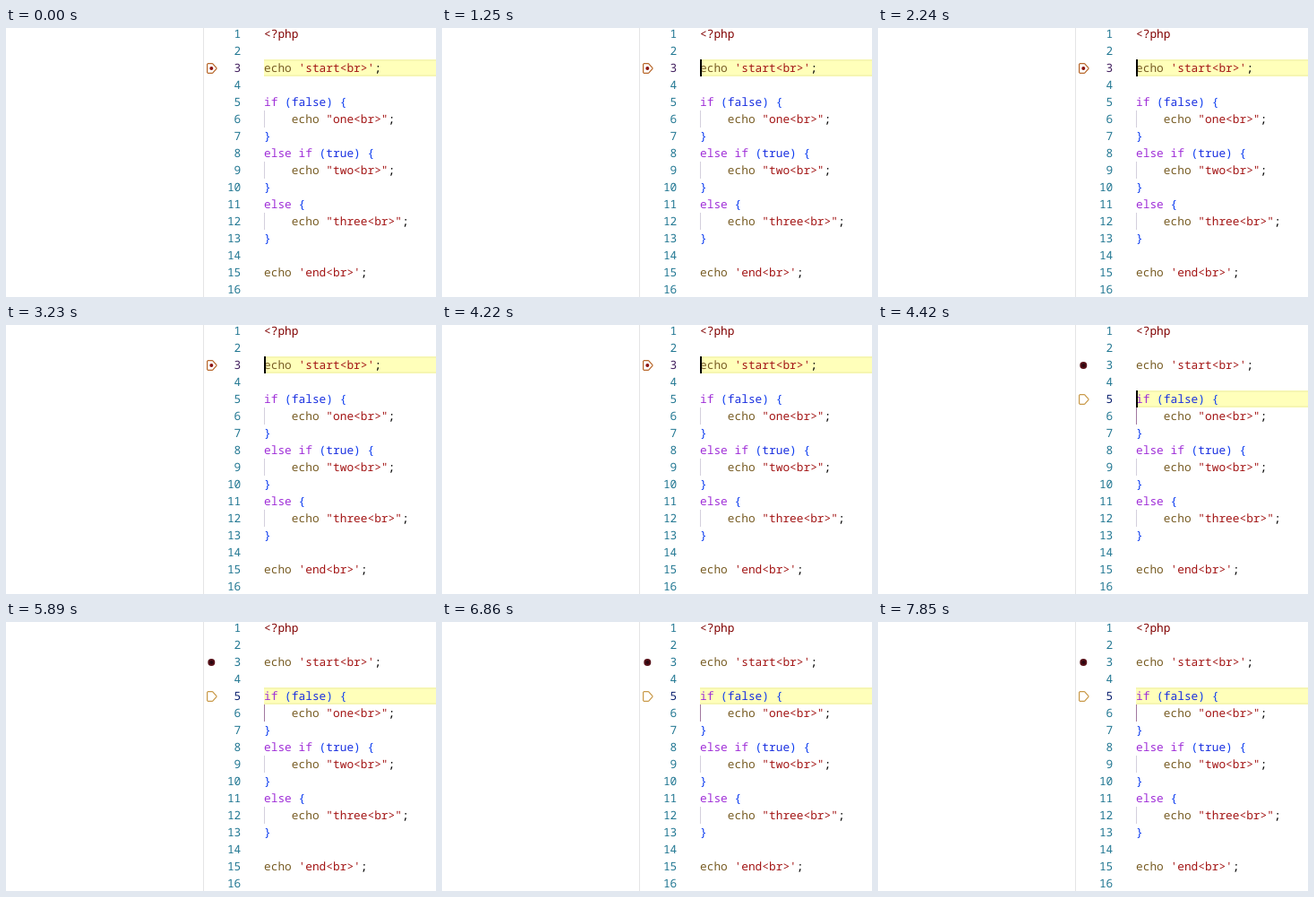
An HTML page that plays this animation: 480x300 px, repeating every 8 s.

```html
<!DOCTYPE html>
<html lang="en">
<head>
<meta charset="utf-8">
<title>Stepping through PHP code</title>
<style>
  html, body { margin: 0; width: 100%; height: 100%; overflow: hidden; background: #fff; }
  svg { display: block; width: 480px; height: 300px; }
  text {
    font: 12.83px "Noto Sans Mono", "DejaVu Sans Mono", monospace;
    white-space: pre;
    text-rendering: geometricPrecision;
  }
  .num { text-anchor: end; fill: #237893; }
  .tag { fill: #800000; }
  .fn { fill: #795e26; }
  .str { fill: #a31515; }
  .key { fill: #a030d8; }
  .const { fill: #1a30e0; }
  .brace { fill: #0c3cf0; }
  .plain { fill: #000; }
</style>
</head>
<body>
<svg id="stage" viewBox="0 0 480 300"></svg>
<script>
(() => {
  const LOOP = 8000, LINE = 19, LEFT = 288;
  const PAUSE_END = 4350, NEXT_STOP = 4420;
  const BLINKS = [260, 790, 1250, 1780, 2240, 2770, 3230, 3760, 4220,
    4830, 5360, 5890, 6350, 6860, 7320, 7850];
  const CODE = [
    "<?php", "", "echo 'start<br>';", "",
    "if (false) {", "    echo \"one<br>\";", "}",
    "else if (true) {", "    echo \"two<br>\";", "}",
    "else {", "    echo \"three<br>\";", "}",
    "", "echo 'end<br>';", ""
  ];
  const ARROW = "M14.5 7.15 10.24 2.41 9.31 2H4.25L3 3.25v9.48l1.25 1.25h5.06l.93-.42 4.26-4.74z" +
    "M9.31 12.73H4.25V3.25h5.06l4.26 4.74z";

  const stage = document.getElementById("stage");
  const rowTop = n => 35 + LINE * (n - 3);

  function add(name, attrs, parent = stage) {
    const node = document.createElementNS("http://www.w3.org/2000/svg", name);
    for (const key in attrs) node.setAttribute(key, attrs[key]);
    return parent.appendChild(node);
  }

  const rect = (x, y, width, height, fill, parent) =>
    add("rect", { x, y, width, height, fill }, parent);

  const show = (node, on) => node.setAttribute("visibility", on ? "visible" : "hidden");

  function kind(token) {
    if (token === "<?php") return "tag";
    if (token === "echo") return "fn";
    if (/^['"]/.test(token)) return "str";
    if (/^(if|else)$/.test(token)) return "key";
    if (/^(true|false)$/.test(token)) return "const";
    return /[(){}]/.test(token) ? "brace" : "plain";
  }

  function drawLine(source, n) {
    const y = rowTop(n) + 14;
    const num = add("text", { x: 262.3, y, class: "num" });
    num.textContent = n;
    const line = add("text", { x: LEFT, y });
    for (const token of source.match(/<\?php|'[^']*'|"[^"]*"|\w+|\s+|./g) || []) {
      add("tspan", { class: kind(token) }, line).textContent = token;
    }
    return num;
  }

  rect(220, 0, 1, 300, "#e4e4e6");

  const current = add("g", {});
  rect(LEFT, 0, 192, 2, "#eeeeee", current);
  rect(LEFT, 17, 192, 2, "#eeeeee", current);
  const glow = rect(LEFT, 0, 192, LINE, "#ffff66", current);
  glow.setAttribute("fill-opacity", 0.45);

  const guides = [6, 9, 12].map(n => rect(LEFT, rowTop(n), 1, LINE, "#d3cfdc"));
  const numbers = CODE.map((source, i) => drawLine(source, i + 1));

  const arrow = add("path", { d: ARROW, "fill-rule": "evenodd" });
  const dot = add("circle", { cx: 229.3, cy: 45 });
  const core = add("circle", { cx: 229.3, cy: 45, r: 2, fill: "#2a0710" });
  const caret = rect(LEFT, 0, 2, LINE, "#000");

  function draw(t) {
    const stopped = t < PAUSE_END;
    const moved = t >= NEXT_STOP;
    const running = !stopped && !moved;
    const line = moved ? 5 : 3;

    current.setAttribute("transform", `translate(0 ${rowTop(line)})`);
    show(glow, !running);
    guides[0].setAttribute("fill", moved ? "#a1789f" : "#d3cfdc");
    numbers[2].style.fill = moved ? "" : "#43205f";
    numbers[4].style.fill = moved ? "#0b216f" : "";

    arrow.setAttribute("transform", `translate(221 ${rowTop(line) + 2})`);
    arrow.setAttribute("fill", moved ? "#c99a4a" : "#b8682c");
    show(arrow, !running);
    dot.setAttribute("r", stopped ? 2 : 4);
    dot.setAttribute("fill", stopped ? "#8c1410" : "#561018");
    show(core, !stopped);

    caret.setAttribute("y", rowTop(line));
    show(caret, BLINKS.filter(b => b <= t).length % 2 === 1);
  }

  const start = performance.now();
  function tick() {
    draw((performance.now() - start) % LOOP);
    requestAnimationFrame(tick);
  }
  tick();
})();
</script>
</body>
</html>
```
